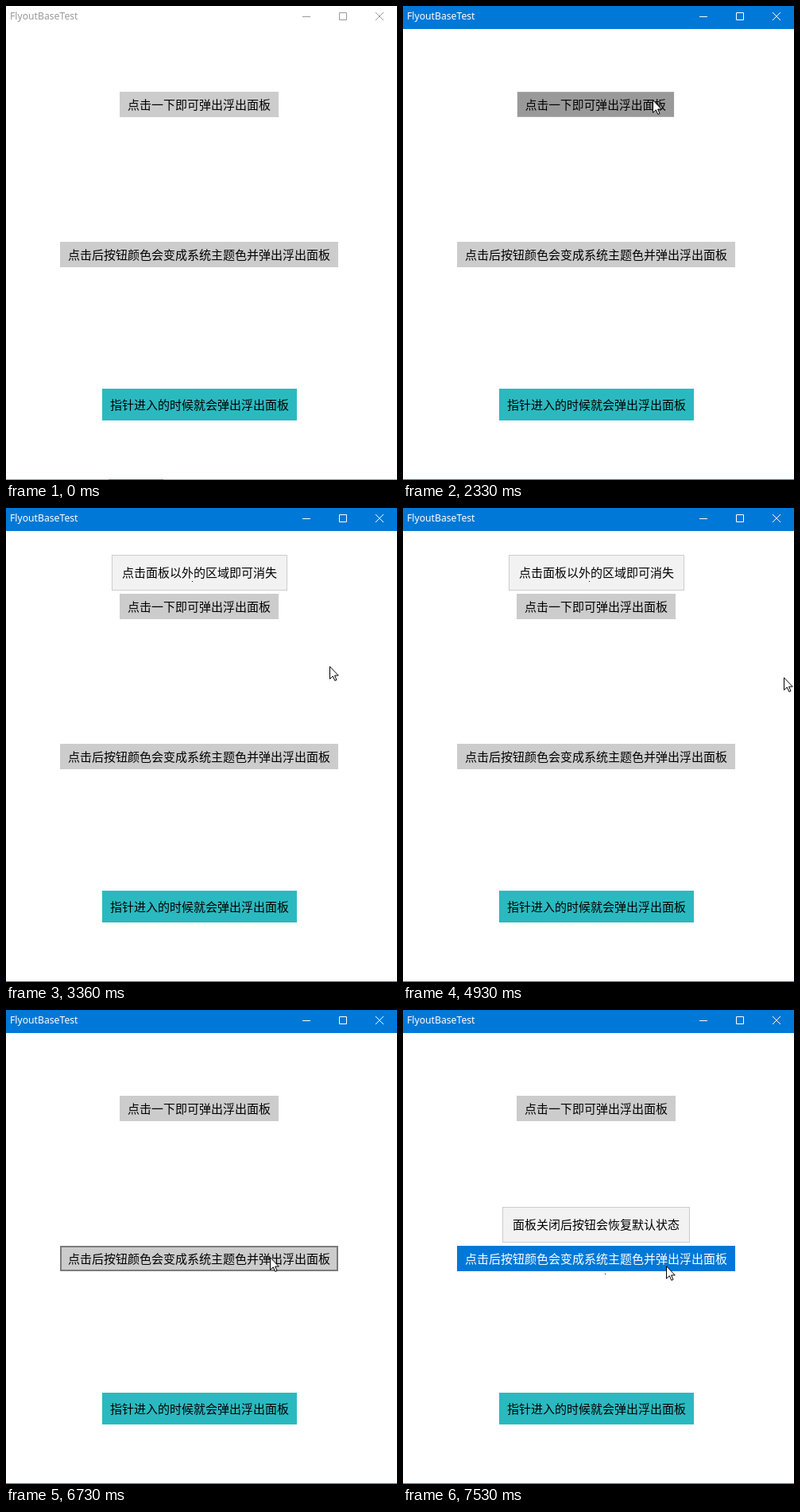
Write an HTML page that moves like this. It is 492x597 px and loops after 8 s.

```html
<!DOCTYPE html>
<html lang="zh-CN">
<head>
<meta charset="utf-8">
<title>FlyoutBaseTest</title>
<style>
  html, body { margin: 0; width: 100%; height: 100%; overflow: hidden; background: #fff; }
  svg { display: block; width: 492px; height: 597px; }
  text { font: 15px "Noto Sans CJK SC", "Noto Sans CJK", sans-serif; }
  #title { font: 12.2px "Noto Sans", "Open Sans", sans-serif; }
</style>
</head>
<body>
<svg viewBox="0 0 492 597">
  <rect width="492" height="597" fill="#fff"/>
  <rect id="bar" width="492" height="29"/>
  <text id="title" x="5" y="17">FlyoutBaseTest</text>
  <path id="icons" fill="none" d="M373 13.5H383M419.5 8.5H428.5V17.5H419.5ZM465 8L475 18M475 8L465 18"/>
  <rect id="edge" y="596" width="492" height="1"/>
  <rect id="streak" x="129" y="596" width="69" height="1" fill="#1b7ea8"/>
  <g id="stage"></g>
  <path id="cursor" fill="#fff" stroke="#000" d="M.5 .7V16.3L4.3 12.8L6.8 18.4L9 17.5L6.6 12H11.3Z"/>
</svg>
<script>
const LOOP = 8000, TICK = 75, ACCENT = '#0078d7';
const HOLD = 140, SETTLE = 350, SHRINK = .026;
const $ = id => document.getElementById(id);
const clamp = v => Math.max(0, Math.min(1, v));
const set = (el, attrs) => { for (const k in attrs) el.setAttribute(k, attrs[k]); };

function add(parent, tag, attrs, content) {
  const el = document.createElementNS('http://www.w3.org/2000/svg', tag);
  set(el, attrs);
  if (content) el.textContent = content;
  return parent.appendChild(el);
}

// Boxes are centred; their width follows from the number of 15px glyphs.
function box(y, h, pad, fill, label) {
  const w = label.length * 15 + 2 * pad, x = Math.round(243 - w / 2);
  const g = add($('stage'), 'g', {});
  const face = add(g, 'rect', { x, y, width: w, height: h, fill });
  const text = add(g, 'text', { x: x + pad, y: Math.floor(y + h / 2 + 6) }, label);
  return { g, face, text, x, y, w, h };
}

function button(y, label) {
  const b = box(y, 32, 10, '#ccc', label);
  b.ring = add(b.g, 'rect', { x: b.x + 1, y: y + 1, width: b.w - 2, height: 30,
    fill: 'none', stroke: '#000', 'stroke-opacity': .4, 'stroke-width': 2 });
  return b;
}

function flyout(y, label, dotX, dotY) {
  const f = box(y, 45, 13, '#f2f2f2', label);
  set(f.face, { x: f.x + .5, y: y + .5, width: f.w - 1, height: 44, stroke: '#ccc' });
  f.dot = add($('stage'), 'rect', { x: dotX, y: dotY, width: 1, height: 1 });
  return f;
}

const first = button(108, '点击一下即可弹出浮出面板');
const second = button(297, '点击后按钮颜色会变成系统主题色并弹出浮出面板');
box(482, 40, 10, '#2bb9c0', '指针进入的时候就会弹出浮出面板');

const scenes = [
  { button: first, hover: 2020, press: 2330, leave: 3060, close: 5890, dot: 2830,
    flyout: flyout(59, '点击面板以外的区域即可消失', 234, 92) },
  { button: second, hover: 6350, press: 6790, leave: 7390, close: LOOP, dot: 7530, after: ACCENT,
    flyout: flyout(248, '面板关闭后按钮会恢复默认状态', 254, 332) }
];

// Pointer strokes: begin, end, destination. Equal times make a jump.
const strokes = [
  [0, 0, 476, 600], [110, 110, 476, 593], [190, 190, 518, 214],
  [970, 1100, 404, 100], [1260, 1410, 363, 93], [1550, 1710, 320, 106],
  [2020, 2020, 314, 114], [2170, 2170, 314, 118],
  [3060, 3130, 314, 167], [3270, 3350, 407, 199], [3430, 3430, 515.5, 193.25],
  [4930, 5200, 333, 292], [6350, 6650, 332, 311], [7240, 7530, 331, 322]
];

function pointer(t) {
  let x = 0, y = 0;
  for (const [begin, end, toX, toY] of strokes) {
    if (t < begin) break;
    const gaps = Math.round((end - begin) / TICK);
    const step = gaps ? Math.min(gaps, Math.floor((t - begin) / (end - begin) * gaps)) : 0;
    const p = (step + 1) / (gaps + 1);
    x += (toX - x) * p;
    y += (toY - y) * p;
  }
  return [Math.round(x), Math.round(y)];
}

// Press shrinks the button, release lets it grow back.
function drawButton(s, t, age) {
  const b = s.button, down = t >= s.press && age < HOLD;
  const lit = s.after && age >= HOLD;
  let shrink = 0;
  if (down) shrink = clamp((age + TICK) / HOLD);
  else if (age >= HOLD) shrink = 1 - clamp((age - HOLD) / SETTLE);
  const k = 1 - SHRINK * shrink, cx = b.x + b.w * .3, cy = b.y + b.h * .4;
  set(b.g, { transform: `translate(${cx} ${cy}) scale(${k}) translate(${-cx} ${-cy})` });
  set(b.face, { fill: down ? '#999' : lit ? s.after : '#ccc' });
  set(b.text, { fill: lit ? '#fff' : '#000' });
  set(b.ring, { opacity: t >= s.hover && t < s.leave && !down ? 1 : 0 });
}

// The panel fades in while it slides up and slows down.
function drawFlyout(s, t, age) {
  const f = s.flyout, since = age - HOLD;
  let alpha = clamp(since / 83);
  if (t >= s.close) alpha = t < s.close + 80 ? .5 : 0;
  const dy = 40 * (1 - clamp(since / SETTLE)) ** 5;
  set(f.g, { opacity: alpha, transform: `translate(0 ${dy})` });
  set(f.dot, { opacity: t >= s.dot ? alpha : 0 });
}

function draw(t) {
  const active = t >= first.press;
  set($('bar'), { fill: active ? ACCENT : '#fff' });
  set($('title'), { fill: active ? '#fff' : '#999' });
  set($('icons'), { stroke: active ? '#fff' : '#999' });
  set($('edge'), { fill: active ? '#1883d7' : '#929b9e' });
  set($('streak'), { opacity: active ? 0 : 1 });
  for (const s of scenes) {
    const age = Math.floor((t - s.press) / TICK) * TICK;
    drawButton(s, t, age);
    drawFlyout(s, t, age);
  }
  set($('cursor'), { transform: `translate(${pointer(t)})` });
}

first.press = scenes[0].press;

function frame() {
  draw(performance.now() % LOOP);
  requestAnimationFrame(frame);
}
frame();
</script>
</body>
</html>
```
